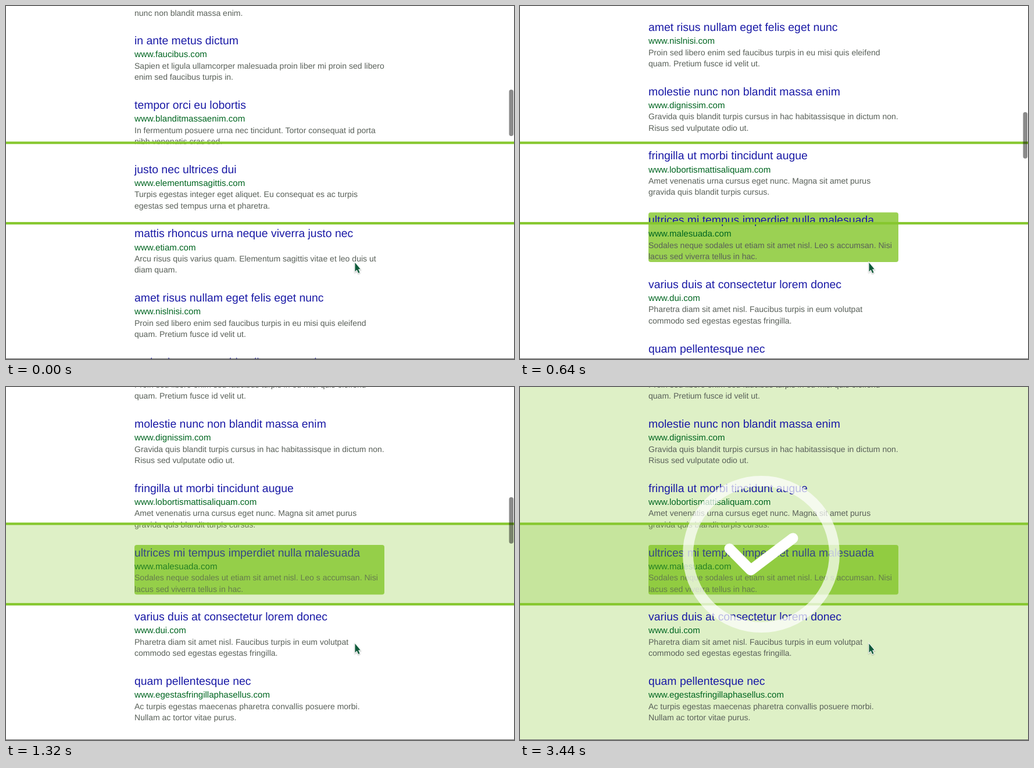
These frames come from a looping animation (874x608 px, 3480 ms). An HTML page with a canvas:

```html
<!DOCTYPE html>
<html lang="en">
<head>
<meta charset="utf-8">
<title>Search results</title>
<style>
  html, body { margin: 0; height: 100%; overflow: hidden; background: #fff; }
  canvas { display: block; }
</style>
</head>
<body>
<canvas id="stage" width="874" height="608"></canvas>
<script>
const ctx = document.getElementById('stage').getContext('2d');
const W = 874, H = 608, LOOP = 3480;
const LEFT = 221, TOP = 46.7, PITCH = 110.7, PICKED = 7;
const BAND_TOP = 235.6, BAND_BOTTOM = 374.2;
const GREEN = '#86c72e', TINT = 0.27;

// title | address | two lines of description
const results = `in ante metus dictum|faucibus|Sapien et ligula ullamcorper malesuada proin liber mi proin sed libero|enim sed faucibus turpis in.
tempor orci eu lobortis|blanditmassaenim|In fermentum posuere urna nec tincidunt. Tortor consequat id porta|nibh venenatis cras sed.
justo nec ultrices dui|elementumsagittis|Turpis egestas integer eget aliquet. Eu consequat es ac turpis|egestas sed tempus urna et pharetra.
mattis rhoncus urna neque viverra justo nec|etiam|Arcu risus quis varius quam. Elementum sagittis vitae et leo duis ut|diam quam.
amet risus nullam eget felis eget nunc|nislnisi|Proin sed libero enim sed faucibus turpis in eu misi quis eleifend|quam. Pretium fusce id velit ut.
molestie nunc non blandit massa enim|dignissim|Gravida quis blandit turpis cursus in hac habitassisque in dictum non.|Risus sed vulputate odio ut.
fringilla ut morbi tincidunt augue|lobortismattisaliquam|Amet venenatis urna cursus eget nunc. Magna sit amet purus|gravida quis blandit turpis cursus.
ultrices mi tempus imperdiet nulla malesuada|malesuada|Sodales neque sodales ut etiam sit amet nisl. Leo s accumsan. Nisi|lacus sed viverra tellus in hac.
varius duis at consectetur lorem donec|dui|Pharetra diam sit amet nisl. Faucibus turpis in eum volutpat|commodo sed egestas egestas fringilla.
quam pellentesque nec|egestasfringillaphasellus|Ac turpis egestas maecenas pharetra convallis posuere morbi.|Nullam ac tortor vitae purus.
facilisis magna etiam tempor orci eu|lobortis|Urna neque viverra justo nec.|Amet risus.`
  .split('\n').map(row => row.split('|'));

// Smooth 0 to 1 between two times
function ease(t, from, to) {
  const x = Math.min(1, Math.max(0, (t - from) / (to - from)));
  return x * x * (3 - 2 * x);
}

function text(string, y, size, color) {
  ctx.font = `${size}px "Liberation Sans", Arial, sans-serif`;
  ctx.textRendering = 'geometricPrecision';
  ctx.fillStyle = color;
  ctx.fillText(string, LEFT, y);
}

function description(string, y) {
  text(string, y, 14.04, '#596059');
}

function rounded(x, y, w, h, r, color, alpha) {
  ctx.globalAlpha = alpha;
  ctx.fillStyle = color;
  ctx.beginPath();
  ctx.roundRect(x, y, w, h, r);
  ctx.fill();
  ctx.globalAlpha = 1;
}

function tint(y, h, amount) {
  ctx.globalAlpha = TINT * amount;
  ctx.fillStyle = GREEN;
  ctx.fillRect(0, y, W, h);
  ctx.globalAlpha = 1;
}

function drawResults(scroll) {
  description('nunc non blandit massa enim.', TOP - PITCH + 80.6 - scroll);
  results.forEach(([title, site, line1, line2], i) => {
    const y = TOP + i * PITCH - scroll;
    if (y < -100 || y > H) return;
    if (i === PICKED) rounded(LEFT, y, 430, 85.5, 4, GREEN, 0.82);
    text(title, y + 19.6, 19.4, '#1a1aa6');
    text(`www.${site}.com`, y + 41.8, 15.08, '#006621');
    description(line1, y + 61.2);
    description(line2, y + 80.6);
  });
}

function drawCheck(alpha) {
  ctx.lineWidth = 18;
  ctx.lineCap = ctx.lineJoin = 'round';
  ctx.strokeStyle = '#fff';
  ctx.globalAlpha = 0.7 * alpha;
  ctx.beginPath();
  ctx.arc(415, 288, 126, 0, 2 * Math.PI);
  ctx.stroke();
  ctx.globalAlpha = alpha;
  ctx.stroke(new Path2D('M360.5 278.5L397 315.5L469.5 260.5'));
  ctx.globalAlpha = 1;
}

const pointer = new Path2D('M600.5 442V457.5L603.7 454.3L606.2 460L608.6 459L606.1 453.3H609.8Z');

function drawPointer() {
  ctx.lineWidth = 2;
  ctx.lineJoin = 'miter';
  ctx.strokeStyle = '#fff';
  ctx.save();
  ctx.shadowColor = 'rgba(0,0,0,.3)';
  ctx.shadowBlur = 2;
  ctx.shadowOffsetY = 1;
  ctx.stroke(pointer);
  ctx.restore();
  ctx.fillStyle = '#0f5a3a';
  ctx.fill(pointer);
}

function draw(t) {
  // Scroll slightly too far, then settle back
  const scroll = 572 * ease(t, 0, 884) - 22.3 * ease(t, 884, 1140);

  ctx.fillStyle = '#fff';
  ctx.fillRect(0, 0, W, H);
  tint(0, H, ease(t, 2160, 2400));
  drawResults(scroll);
  tint(BAND_TOP, BAND_BOTTOM - BAND_TOP, ease(t, 980, 1120));

  ctx.fillStyle = GREEN;
  for (const y of [BAND_TOP, BAND_BOTTOM]) ctx.fillRect(0, y - 2.1, W, 4.2);

  rounded(865.5, 144 + scroll * 0.083, 7.5, 80, 3.75, '#000', 0.46 * (1 - ease(t, 1900, 2160)));
  drawCheck(ease(t, 2200, 2480));
  drawPointer();
  ctx.fillStyle = '#6b6b6b';
  ctx.fillRect(0, H - 1, W, 1);
}

const start = performance.now();
function tick() {
  draw((performance.now() - start) % LOOP);
  requestAnimationFrame(tick);
}
tick();
</script>
</body>
</html>
```
